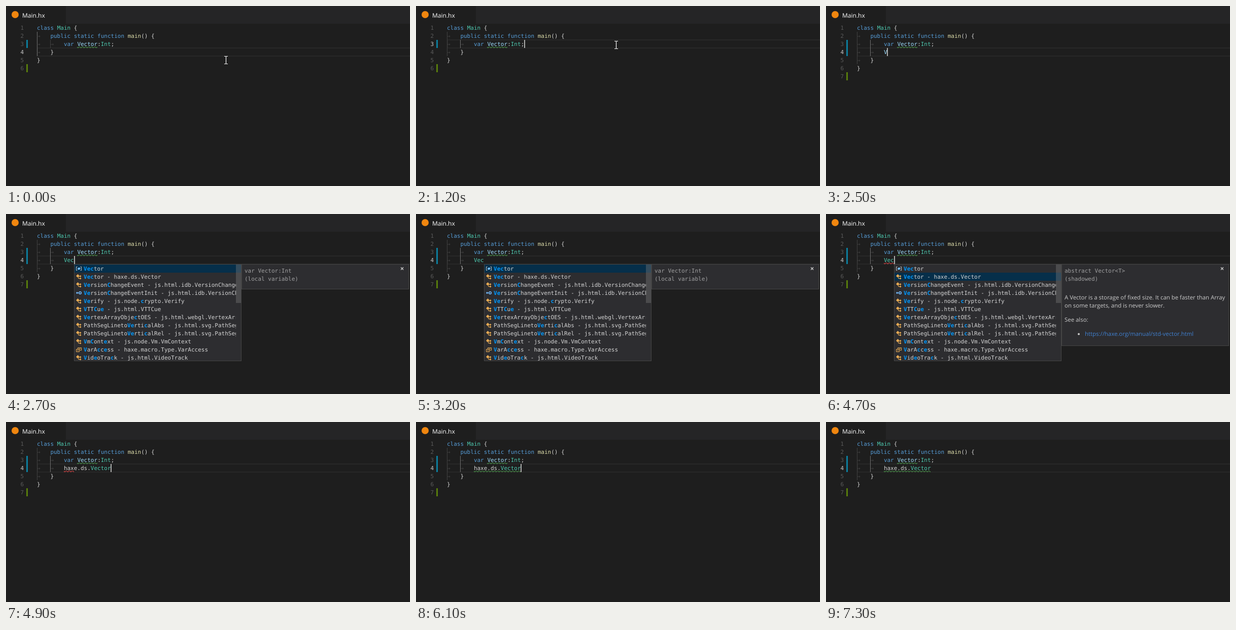
Write an HTML page that moves like this. It is 796x356 px and loops after 7.7 s.

```html
<!DOCTYPE html>
<html lang="en">
<head>
<meta charset="utf-8">
<title>Code completion</title>
<style>
html, body { margin: 0; width: 100%; height: 100%; overflow: hidden; background: #1e1e1e; }
svg { display: block; width: 796px; height: 356px; }
text { white-space: pre; text-rendering: geometricPrecision; font: 11px "DejaVu Sans Mono", monospace; fill: #d4d4d4; }
.ui { font: 11.4px "Open Sans", sans-serif; fill: #ccc; }
.tab { font: 12px "Open Sans", sans-serif; fill: #fff; }
.k { fill: #569cd6; }
.t { fill: #4ec9b0; }
.v { fill: #9cdcfe; }
.f { fill: #dcdcaa; }
.num { fill: #5a5a5a; }
.now { fill: #c6c6c6; }
.arrow { fill: #434343; }
.hit { fill: #0097fb; font-weight: bold; }
.dim { fill: #a0a0a1; }
.link { fill: #4080d0; }
</style>
</head>
<body>
<svg id="stage" viewBox="0 0 796 356" xmlns="http://www.w3.org/2000/svg"></svg>
<script>
const LOOP = 7700, LEFT = 60.9, CH = 6.622;
const stage = document.getElementById('stage');
const layers = [];

const rowY = row => 19 + row * 16;
const colX = col => LEFT + col * CH;
const rect = (x, y, w, h, fill, more = '') =>
  `<rect x="${x}" y="${y}" width="${w}" height="${h}" fill="${fill}" ${more}/>`;
const text = (x, y, body, cls = '') => `<text x="${x}" y="${y}" class="${cls}">${body}</text>`;
const path = (d, stroke, width = 1) =>
  `<path d="${d}" fill="none" stroke="${stroke}" stroke-width="${width}"/>`;

// Visible while from <= time < to
function show(from, to, body) {
  const g = document.createElementNS('http://www.w3.org/2000/svg', 'g');
  g.innerHTML = body;
  stage.append(g);
  layers.push({ from, to, g });
}

// Code tokens are "class|text"
function code(row, col, ...tokens) {
  const body = tokens.map(s => {
    const [cls, word] = s.split('|');
    return `<tspan class="${cls}">${word}</tspan>`;
  }).join('');
  return text(colX(col), rowY(row) + 12, body);
}
const arrows = (row, count) =>
  [...Array(count).keys()].map(i => text(colX(i * 4), rowY(row) + 12, '→', 'arrow')).join('');
const guide = (col, first, last, active) =>
  rect(Math.round(colX(col)), rowY(first), 1, (last - first + 1) * 16, active ? '#707070' : '#404040');
const bar = (row, fill) => rect(40, rowY(row), 3, 16, fill);
const squiggle = (row, x, w, kind) => {
  const y = rowY(row) + 13;
  return `<g transform="translate(${x} ${y})">${rect(0, 0, w, 3, `url(#${kind})`)}</g>`;
};
const gutter = (count, now) => {
  let out = '';
  for (let n = 1; n <= count; n++)
    out += text(28.4, rowY(n) + 12, n, n === now ? 'now' : 'num');
  return out;
};
const currentLine = row => rect(62, rowY(row), 736, 16, 'none', 'stroke="#282828" stroke-width="2"');

const wave = (id, fill) => `<pattern id="${id}" width="6" height="3" patternUnits="userSpaceOnUse">
  <path fill="${fill}" d="M5.5 0 2.5 3H1.1L4.1 0zM4 0 6 2V.6L5.4 0zM0 2 1 3H2.4L0 .6z"/></pattern>`;

const BLUE = '#0c7d9d', GREEN = '#587c0c';

show(0, LOOP, `<defs>${wave('warn', '#4d9e4d')}${wave('error', '#ea4646')}
  <clipPath id="list"><rect x="135" y="100" width="318" height="190"/></clipPath></defs>` +
  rect(0, 0, 796, 356, '#1e1e1e') + rect(118, 0, 678, 35, '#252526') +
  '<circle cx="18" cy="17" r="7" fill="#f0860f"/>' + text(32, 22.5, 'Main.hx', 'tab'));

show(0, 1200, currentLine(4) + gutter(6, 4) + guide(0, 2, 4, true) + guide(4, 3, 3));
show(1200, 2000, currentLine(3) + gutter(6, 3) + guide(0, 2, 4) + guide(4, 3, 3, true));
show(2000, LOOP, currentLine(4) + gutter(7, 4) + guide(0, 2, 5) + guide(4, 3, 4, true));

show(0, LOOP,
  code(1, 0, 'k|class ', 't|Main', '| {') + arrows(2, 1) +
  code(2, 4, 'k|public static function ', 'f|main', '|() {') + arrows(3, 2) +
  code(3, 8, 'k|var ', 'v|Vector', '|:', 't|Int', '|;') +
  squiggle(3, 140, 40, 'warn') + bar(3, BLUE));
show(0, 2000, arrows(4, 1) + code(4, 4, '|}') + code(5, 0, '|}') + bar(6, GREEN));
show(2000, LOOP, arrows(4, 2) + arrows(5, 1) + code(5, 4, '|}') + code(6, 0, '|}') + bar(7, GREEN));
show(2200, LOOP, bar(4, BLUE));

// Typed line
show(2500, 2700, code(4, 8, 'v|V'));
show(2700, 4900, code(4, 8, 't|Vec'));
show(4900, LOOP, code(4, 8, '|haxe.ds.', 't|Vector'));
show(3600, 5900, squiggle(4, 114, 20, 'error'));
show(5900, LOOP, squiggle(4, 114, 92, 'warn'));

// Completion list; * marks a matched letter
const items = [
  ['var', '*V*e*ctor'],
  ['cls', '*V*e*ctor - haxe.ds.Vector'],
  ['cls', '*V*ersion*ChangeEvent - js.html.idb.VersionChangeEvent'],
  ['int', '*V*ersion*ChangeEventInit - js.html.idb.VersionChangeEventInit'],
  ['cls', '*V*erify - js.node.*crypto.Verify'],
  ['cls', '*VTT*Cu*e - js.html.VTTCue'],
  ['cls', '*V*ertexArrayObje*ctOES - js.html.webgl.VertexArrayObjectOES'],
  ['cls', 'PathSegLineto*V*erti*calAbs - js.html.svg.PathSegLinetoVerticalAbs'],
  ['cls', 'PathSegLineto*V*erti*calRel - js.html.svg.PathSegLinetoVerticalRel'],
  ['cls', '*Vm*Cont*ext - js.node.Vm.VmContext'],
  ['enum', '*VarA*cc*ess - haxe.macro.Type.VarAccess'],
  ['cls', '*Vid*eoTra*ck - js.html.VideoTrack']
];
const GOLD = '#e8ab53', SKY = '#75beff';
const icons = {
  cls: '<path d="M3.5 -5 6.5 -2 3 1.5 0 -1.500zM8.500 -3 10.500 -1 8.500 1 6.500 -1zM8.500 1.500 10.500 3.500 8.500 5.500 6.500 3.500z" fill="#e8ab53"/>' +
    path('M4 -.5H7M4.500 0V3.500H7', GOLD),
  var: path('M2.500 -3.500H.5V3.500H2.500M8.500 -3.500H10.500V3.500H8.500', '#c5c5c5') +
    '<path d="M3 -.5 6 -2.500 8.500 -1V1L5.500 2.500 3 1.500z" fill="#75beff"/>',
  int: '<circle cx="2" cy="0" r="1.700" fill="#75beff"/><circle cx="8" cy="0" r="2.200" fill="none" stroke="#75beff" stroke-width="1.500"/>' +
    path('M3 0H6', SKY),
  enum: path('M3.500 -1V-3.500H10.500V1.500H7.500M.5 -.5H6.500V4.500H.5zM2 2H5M5.500 -1.500H9', GOLD)
};

const list = selected => rect(134.5, 99.5, 329, 191, '#2d2d30', 'stroke="#454545"') +
  '<g clip-path="url(#list)">' +
  rect(135, 100 + selected * 16, 328, 16, '#062f4a') +
  items.map(([kind, label], i) =>
    `<g transform="translate(138 ${108 + i * 16})">${icons[kind]}</g>` +
    text(153, 112 + i * 16, label.replace(/\*(.)/g, '<tspan class="hit">$1</tspan>'))
  ).join('') + '</g>' +
  rect(453, 100 + selected * 16, 10, 16, '#062f4a') +
  rect(453, 100, 10, 76, '#797979', 'opacity=".4"');

const panel = (height, first, second) =>
  rect(464.5, 99.5, 329, height - 1, '#2d2d30', 'stroke="#454545"') +
  text(470, 116, first, 'dim') + text(470, 132, second, 'dim') +
  path('M778 105.500 783 110.500M783 105.500 778 110.500', '#c8c8c8', 1.5);

show(2700, 3300, list(0) + panel(50, 'var Vector:Int', '(local variable)'));
show(3300, 4900, list(1) + panel(162, 'abstract Vector&lt;T&gt;', '(shadowed)') +
  text(470, 168.5, 'A Vector is a storage of fixed size. It can be faster than Array', 'ui') +
  text(470, 185, 'on some targets, and is never slower.', 'ui') +
  text(470, 213, 'See also:', 'ui') +
  '<circle cx="498" cy="237.500" r="2" fill="#ccc"/>' +
  text(510, 241, 'https://haxe.org/manual/std-vector.html', 'ui link'));

// Text caret: from, to, x, row
[
  [1200, 1700, 213, 3], [2000, 2500, 113, 4], [2500, 2700, 120, 4],
  [2700, 3200, 134, 4], [3700, 4200, 134, 4], [4700, 4900, 134, 4],
  [4900, 5300, 206, 4], [5800, 6300, 206, 4], [6800, 7300, 206, 4]
].forEach(([from, to, x, row]) => show(from, to, rect(x, rowY(row), 2, 16, '#aeafad')));

// Mouse pointer: from, to, x, y
const beam = path('M-3.500 -7.500H-1L0 -7 1 -7.500H3.500M0 -7V7M-3.500 7.500H-1L0 7 1 7.500H3.500', '#fff', 1.2);
[
  [0, 100, 433.5, 107], [100, 200, 407.5, 90], [200, 900, 394.5, 83],
  [900, 1500, 394.5, 77], [1500, 1600, 500.5, 98], [1600, 1700, 658.5, 133],
  [5900, 6000, 722.5, 348]
].forEach(([from, to, x, y]) => show(from, to, `<g transform="translate(${x} ${y})">${beam}</g>`));

const start = performance.now();
function draw() {
  const t = (performance.now() - start) % LOOP;
  for (const { from, to, g } of layers)
    g.style.display = t >= from && t < to ? '' : 'none';
  requestAnimationFrame(draw);
}
draw();
</script>
</body>
</html>
```
